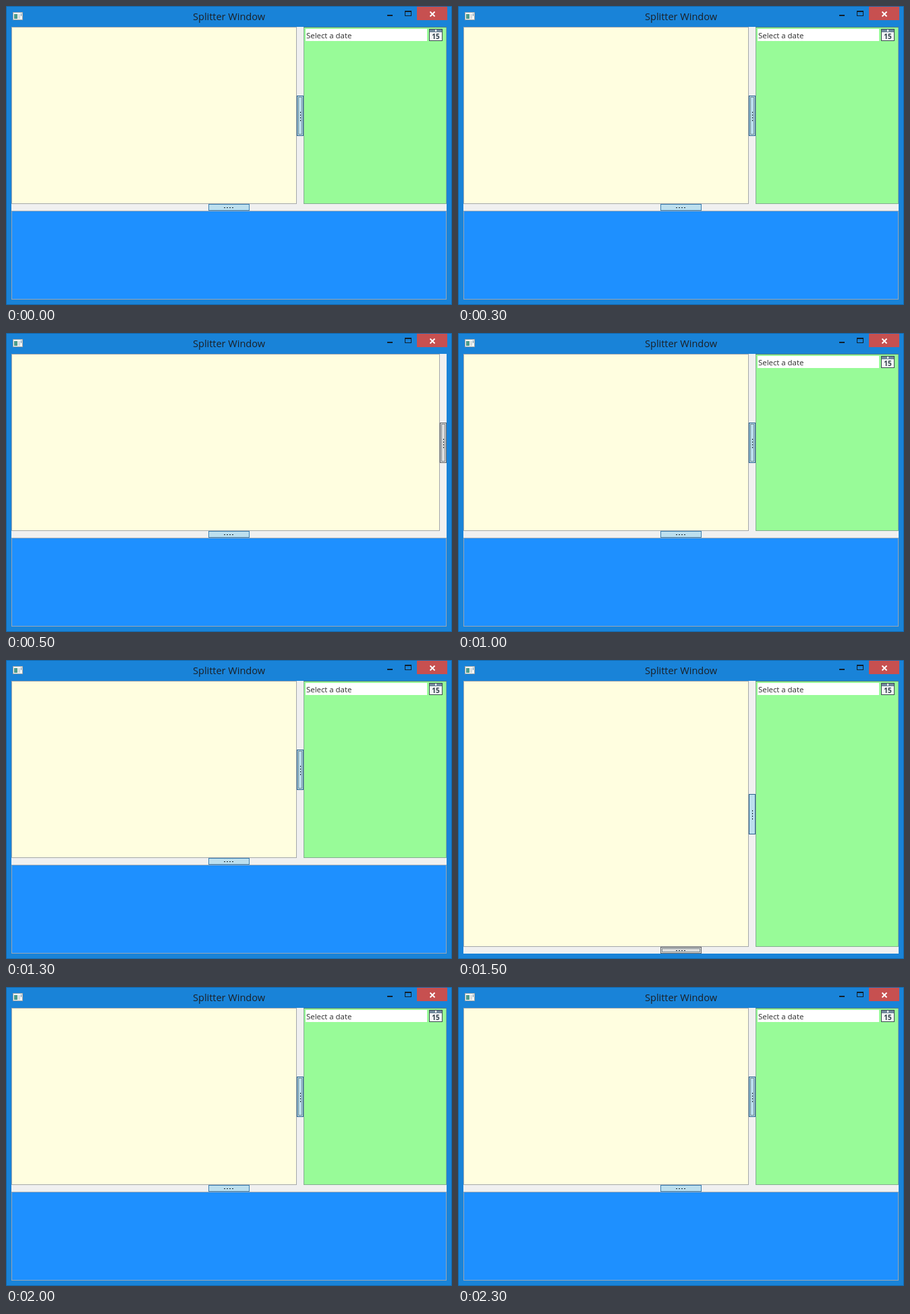
An HTML page with a canvas for the animation above (2.5 s loop, 661 by 444 pixels).

```html
<!DOCTYPE html>
<html lang="en">
<head>
<meta charset="utf-8">
<title>Splitter Window</title>
<style>
  html, body { margin: 0; width: 100%; height: 100%; overflow: hidden; }
  canvas { display: block; }
</style>
</head>
<body>
<canvas id="stage" width="661" height="444"></canvas>
<script>
const ctx = document.getElementById("stage").getContext("2d");

const STEP = 500;
const OPEN = { splitX: 431, splitY: 294, focus: "vertical" };
const NO_RIGHT = { ...OPEN, splitX: 643 };
const NO_BOTTOM = { splitX: 431, splitY: 426, focus: "horizontal" };
const SEQUENCE = [OPEN, NO_RIGHT, OPEN, NO_BOTTOM, OPEN];

const CLIENT = { left: 8, top: 31, right: 653, bottom: 436 };
const BAR = 10;
const GRIP = 60;
const HOT = { fill: "#bcdfee", edge: "#2c628b" };
const WARM = { fill: "#bcdfee", edge: "#3c7fb1" };
const COLD = { fill: "#dddddd", edge: "#606468" };

function rect(x, y, w, h, color) {
  ctx.fillStyle = color;
  ctx.fillRect(x, y, w, h);
}

function box(x, y, w, h, fill, edge) {
  rect(x, y, w, h, edge);
  rect(x + 1, y + 1, w - 2, h - 2, fill);
}

function label(text, x, y, font, color, align = "left") {
  ctx.font = font;
  ctx.fillStyle = color;
  ctx.textAlign = align;
  ctx.fillText(text, x, y);
}

function focusRect(x, y, w, h) {
  ctx.strokeStyle = "#20303a";
  ctx.lineWidth = 1;
  ctx.setLineDash([1, 1]);
  ctx.strokeRect(x + 0.5, y + 0.5, w - 1, h - 1);
  ctx.setLineDash([]);
}

function drawFrame() {
  box(0, 0, 661, 444, "#1983d8", "#1565a5");
  label("Splitter Window", 330.5, 21, '14.5px "Open Sans", sans-serif', "#1b2026", "center");

  // Window icon
  box(10, 9, 15, 12, "#f4f6f6", "#9aa4a8");
  rect(12, 12, 5, 7, "#4d9c8c");
  rect(18, 12, 3, 7, "#d5dcdd");
  rect(22, 11, 1, 4, "#6b8fae");

  // Caption buttons
  rect(565, 13, 8, 2, "#12202c");
  rect(591, 7, 10, 8, "#12202c");
  rect(592, 9, 8, 5, "#1983d8");
  rect(609, 1, 45, 20, "#c75050");
  ctx.strokeStyle = "#fff";
  ctx.lineWidth = 1.8;
  ctx.beginPath();
  ctx.moveTo(628.5, 8.5);
  ctx.lineTo(635.5, 15.5);
  ctx.moveTo(635.5, 8.5);
  ctx.lineTo(628.5, 15.5);
  ctx.stroke();
}

function drawDatePicker() {
  rect(444, 34, 180, 18, "#fff");
  label("Select a date", 445, 48, '11.4px "Open Sans", sans-serif', "#2b2b2b");

  box(627, 34, 20, 18, "#f3f5f6", "#3d4a52");
  rect(628, 35, 18, 4, "#71889c");
  rect(636, 35, 2, 3, "#fff");
  label("15", 637, 49, 'bold 10px "Open Sans", sans-serif', "#2d3c48", "center");
}

function drawGrip(x, y, vertical, style, focused) {
  const w = vertical ? BAR : GRIP + 1;
  const h = vertical ? GRIP : BAR;
  box(x, y, w, h, style.fill, style.edge);
  for (let i = 0; i < 4; i++) {
    if (vertical) rect(x + 5, y + 24 + i * 4, 1, 2, "#182630");
    else rect(x + 23 + i * 4, y + 5, 2, 1, "#182630");
  }
  if (focused) focusRect(x + 2, y + 2, w - 4, h - 4);
}

function drawContent({ splitX, splitY, focus }) {
  const { left, top, right, bottom } = CLIENT;
  const upper = splitY - top;
  const rightX = splitX + BAR;
  const lowerY = splitY + BAR;
  const rightOpen = rightX < right;
  const lowerOpen = lowerY < bottom;

  rect(left, top, right - left, bottom - top, "#f0f0f0");
  box(left, top, splitX - left, upper, "#fffee0", "#a5a8ab");

  if (rightOpen) {
    box(rightX, top, right - rightX, upper, "#98fb98", "#84ad91");
    rect(rightX, top, right - rightX, 1, "#587e79");
    drawDatePicker();
  }
  if (lowerOpen) {
    box(left, lowerY, right - left, bottom - lowerY, "#1e90ff", "#98a6b4");
  }

  const gripY = top + Math.ceil((upper - GRIP) / 2);
  drawGrip(splitX, gripY, true, rightOpen ? HOT : COLD, focus === "vertical");
  drawGrip(300, splitY, false, lowerOpen ? WARM : COLD, focus === "horizontal");
}

function render(now) {
  const step = Math.floor(now / STEP) % SEQUENCE.length;
  drawFrame();
  drawContent(SEQUENCE[step]);
  requestAnimationFrame(render);
}

requestAnimationFrame(render);
</script>
</body>
</html>
```
